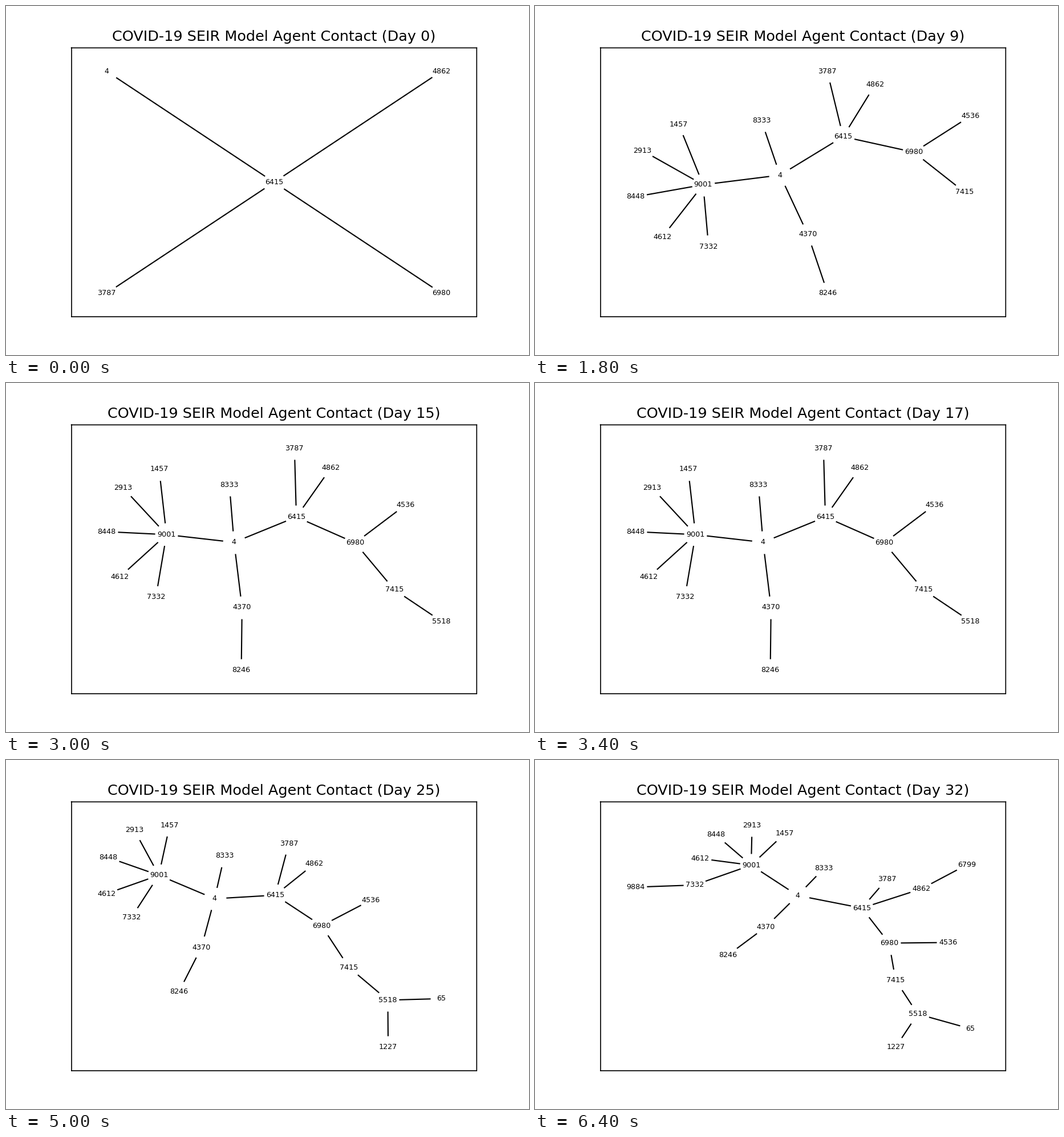
Recreate the animation shown at these times as a matplotlib script. Size 917x611 px, loop 6.6 s.

```python
import numpy as np
import matplotlib.pyplot as plt
from matplotlib.animation import FuncAnimation
from matplotlib.collections import LineCollection

WIDTH, HEIGHT = 917, 611
DPI = WIDTH / 6
DAYS, INTERVAL = 33, 200
MARGIN = 0.105

# Who infected whom, siblings counter-clockwise
ROOT = 6415
GROUPS = {
    ROOT: (4862, 3787, 4, 6980),
    4: (8333, 9001, 4370),
    9001: (1457, 2913, 8448, 4612, 7332),
    4370: (8246,),
    6980: (7415, 4536),
    7415: (5518,),
    5518: (1227, 65),
    4862: (6799,),
    7332: (9884,),
}
CONTACT = {kid: agent for agent, kids in GROUPS.items() for kid in kids}
AGENTS = list(CONTACT)

# First day, agents shown, and the pixels of two agents that fix the rotation
GUIDES = (4, 6980)
STAGES = [
    (0, [4862, 4, 3787, 6980], [(176, 114), (764, 503)]),
    (3, [4862, 3787, 6980, 4, 4370, 9001, 8333], [(491, 376), (176, 213.5)]),
    (9, AGENTS[:15], [(429.5, 296), (664.5, 256)]),
    (15, AGENTS[:16], [(399.5, 279), (612.5, 280)]),
    (20, AGENTS[:18], [(365.5, 242.5), (553.5, 290)]),
    (27, AGENTS[:19], [(392, 233), (582.5, 308.5)]),
    (31, AGENTS[:20], [(460, 237.5), (621, 321)]),
]

fig, ax = plt.subplots(
    figsize=((WIDTH + 1e-6) / DPI, (HEIGHT + 1e-6) / DPI), dpi=DPI)
fig.subplots_adjust(left=0.125, right=0.9, bottom=0.11, top=0.88)
ax.set(xlim=(-MARGIN, 1 + MARGIN), ylim=(-MARGIN, 1 + MARGIN),
       xticks=[], yticks=[])
for side in ("right", "top"):
    ax.spines[side].set_snap(False)


def kids_of(agent, shown):
    return [a for a in shown if CONTACT[a] == agent]


def leaves(agent, shown):
    return sum(leaves(kid, shown) for kid in kids_of(agent, shown)) or 1


def fan_out(agent, shown, spot=(0, 0), start=0, width=2 * np.pi):
    """Equal-angle tree drawing: each subtree gets a wedge by its leaves."""
    places = {agent: spot}
    share = width / leaves(agent, shown)
    for kid in kids_of(agent, shown):
        wedge = share * leaves(kid, shown)
        mid = start + wedge / 2
        step = (spot[0] + np.cos(mid), spot[1] + np.sin(mid))
        places.update(fan_out(kid, shown, step, start, wedge))
        start += wedge
    return places


def path_lengths(agents):
    dist = np.zeros((len(agents), len(agents)))
    for i, agent in enumerate(agents[1:], 1):
        j = agents.index(CONTACT[agent])
        dist[i, :i] = dist[:i, i] = dist[j, :i] + 1
    return dist


def kamada_kawai(pos, dist, steps=3000):
    """Minimise the Kamada-Kawai stress by majorization."""
    eye = np.eye(len(pos))
    weight = (1 - eye) / (dist + eye) ** 2
    solve = np.linalg.pinv(np.diag(weight.sum(1)) - weight)
    pull = weight * dist
    for _ in range(steps):
        gap = np.hypot(*(pos[:, None] - pos).transpose(2, 0, 1))
        ratio = pull / (gap + eye)
        pos = solve @ (np.diag(ratio.sum(1)) - ratio) @ pos
    return pos


def orient(pos, rows, pixels):
    """Turn and fit into the unit box so that the rows land on the pixels."""
    goal = ax.transData.inverted().transform(
        [(x, HEIGHT - y) for x, y in pixels])
    turn = np.radians(np.arange(0, 360, 0.05))
    c, s = np.cos(turn), np.sin(turn)
    placed = pos @ np.array([[c, s], [-s, c]]).transpose(2, 0, 1)
    low = placed.min(1, keepdims=True)
    placed = (placed - low) / (placed.max(1, keepdims=True) - low)
    error = ((placed[:, rows] - goal) ** 2).sum((1, 2))
    return placed[error.argmin()]


def arrange(shown, pixels):
    places = fan_out(ROOT, shown)
    agents = list(places)
    pos = kamada_kawai(np.array(list(places.values())), path_lengths(agents))
    rows = [agents.index(guide) for guide in GUIDES]
    return dict(zip(agents, orient(pos, rows, pixels)))


layouts = [(day, arrange(shown, pixels)) for day, shown, pixels in STAGES]

edges = ax.add_collection(
    LineCollection([], colors="k", linewidths=1.0, zorder=1), autolim=False)
nodes = ax.scatter([], [], s=300, c="white", linewidths=1.5, zorder=2)
labels = {agent: ax.text(0, 0, str(agent), fontsize=6, ha="center",
                         va="center", zorder=3)
          for agent in [ROOT, *AGENTS]}
title = ax.set_title("", fontsize=12)


def draw(day):
    places = [layout for start, layout in layouts if start <= day][-1]
    edges.set_segments([(places[CONTACT[a]], spot)
                        for a, spot in places.items() if a != ROOT])
    nodes.set_offsets(list(places.values()))
    for agent, label in labels.items():
        label.set_visible(agent in places)
        label.set_position(places.get(agent, (0, 0)))
    title.set_text(f"COVID-19 SEIR Model Agent Contact (Day {day})")
    return edges, nodes, title, *labels.values()


anim = FuncAnimation(fig, draw, frames=DAYS, interval=INTERVAL,
                     repeat=True, repeat_delay=0)
plt.show()
```
